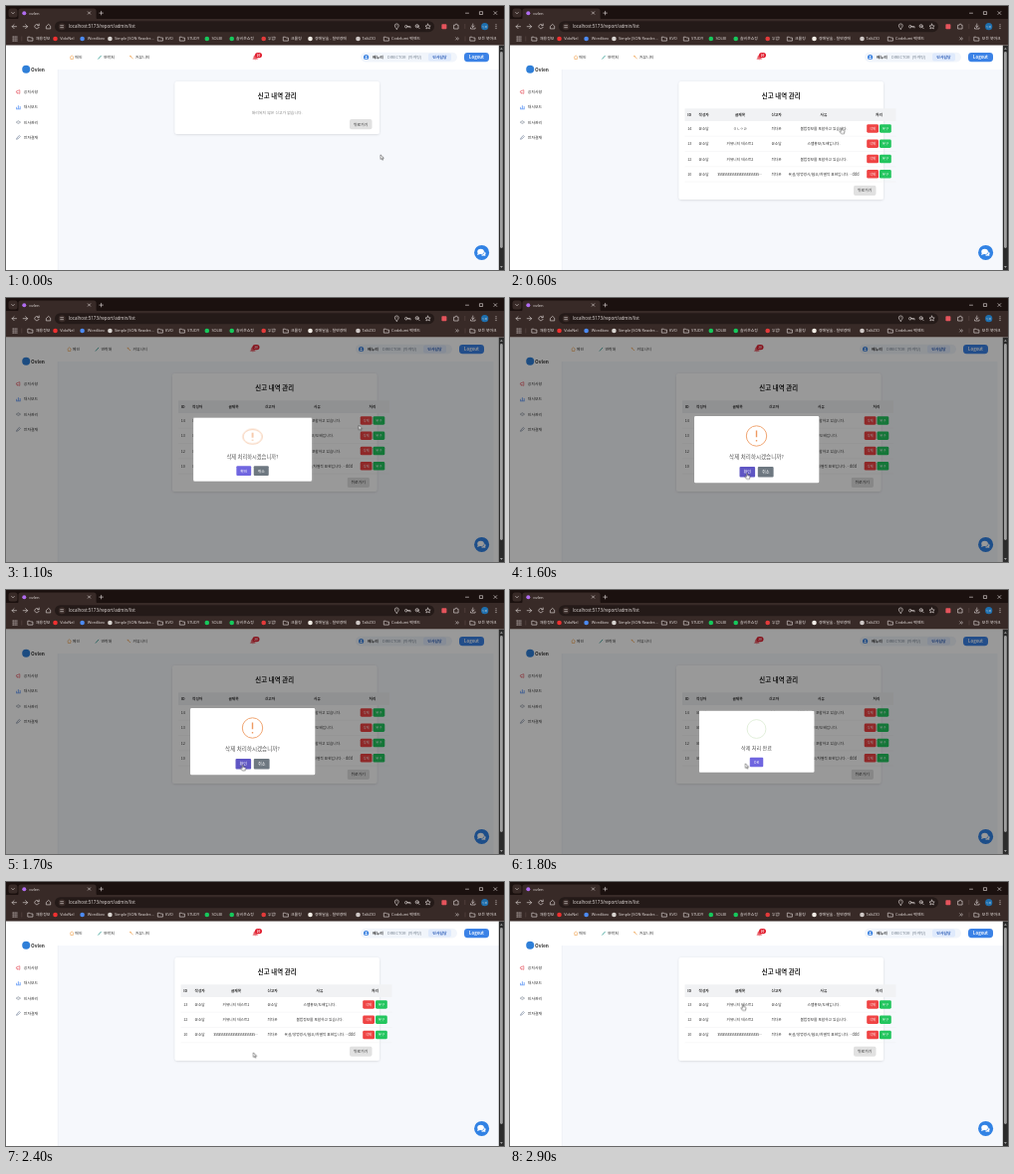
Recreate the animation shown at these times as an HTML page. Size 500x266 px, loop 3000 ms.

```html
<!DOCTYPE html>
<html lang="ko">
<head>
<meta charset="utf-8">
<title>Report list</title>
<style>
html, body { margin: 0; width: 100%; height: 100%; overflow: hidden; background: #fff; }
svg { display: block; width: 100vw; height: 100vh; }
text { font: 3.9px "Noto Sans CJK KR", "Noto Sans", sans-serif; fill: #333; white-space: pre; }
.ui text { font-family: "Open Sans", "Noto Sans CJK KR", sans-serif; fill: #e6dfdd; }
.mid text, text.mid { text-anchor: middle; }
.b { font-weight: 700; }
.line { fill: none; stroke: #dcd4d2; stroke-width: .65; stroke-linecap: round; stroke-linejoin: round; }
.cell text { font-size: 3.7px; }
.cell .btn, .w { fill: #fff; }
.cell .btn { font-size: 3.3px; }

/* The script moves every animation forward in tenths of a second. */
.t { animation: 3s step-end infinite paused; }
.loaded { animation-name: loaded; }
.empty { animation-name: empty; }
.card { animation-name: card; }
.back { animation-name: back; }
.first { animation-name: first; }
.rest { animation-name: rest; }
.open { animation-name: open; }
.shift { animation-name: shift; --dx: -2.5; }
.far { --dx: -5; }
.ask { animation-name: ask; }
.done { animation-name: done; }
.hover1 { animation-name: hover1; }
.hover2 { animation-name: hover2; }
.arrow { animation-name: arrow; }
.hand { animation-name: hand; }
.cursor { animation: move 3s ease-in-out infinite paused; }
.pop { transform-origin: 247.5px 152.5px; animation: pop .15s .983s both paused; }
.done .pop { animation-delay: 1.775s; }
.warn { transform-origin: 247.5px 139px; animation: flip .25s .983s both paused; }
.check { stroke-dasharray: 1 2; animation: draw .11s 1.977s linear both paused; }

@keyframes loaded { 0% { visibility: hidden } 3%, 100% { visibility: visible } }
@keyframes empty { 0% { visibility: visible } 3%, 100% { visibility: hidden } }
@keyframes card { 0% { height: 53px } 3% { height: 119px } 63%, 100% { height: 104px } }
@keyframes back {
  0% { transform: none }
  3% { transform: matrix(1, 0, 0, 1, 0, 66.8) }
  63%, 100% { transform: matrix(1, 0, 0, 1, 0, 51.5) }
}
@keyframes first { 0% { opacity: 1 } 63%, 100% { opacity: 0 } }
@keyframes rest { 0% { transform: none } 63%, 100% { transform: matrix(1, 0, 0, 1, 0, -15.3) } }
@keyframes open { 0% { visibility: hidden } 33% { visibility: visible } 79.5%, 100% { visibility: hidden } }
@keyframes shift {
  0% { transform: none }
  33% { transform: matrix(1, 0, 0, 1, var(--dx), 0) }
  79.5%, 100% { transform: none }
}
@keyframes ask { 0% { visibility: hidden } 33% { visibility: visible } 59%, 100% { visibility: hidden } }
@keyframes done { 0% { visibility: hidden } 59% { visibility: visible } 79.5%, 100% { visibility: hidden } }
@keyframes hover1 { 0% { fill: #7066e0 } 48%, 100% { fill: #5f56c4 } }
@keyframes hover2 { 0% { fill: #7066e0 } 69%, 100% { fill: #5f56c4 } }
@keyframes hand {
  0%, 35%, 59%, 79.5% { visibility: hidden }
  3%, 48%, 69%, 85%, 100% { visibility: visible }
}
@keyframes arrow {
  0%, 35%, 59%, 79.5% { visibility: visible }
  3%, 48%, 69%, 85%, 100% { visibility: hidden }
}
@keyframes move {
  0% { transform: matrix(1, 0, 0, 1, 376, 149.8) }
  20% { transform: matrix(1, 0, 0, 1, 333, 122.6) }
  33.333% { transform: matrix(1, 0, 0, 1, 364.5, 124) }
  50%, 55% { transform: matrix(1, 0, 0, 1, 238, 176.4) }
  60% { transform: matrix(1, 0, 0, 1, 236.3, 174.8) }
  72%, 77% { transform: matrix(1, 0, 0, 1, 249, 174.2) }
  96.667%, 100% { transform: matrix(1, 0, 0, 1, 234, 123.4) }
}
@keyframes pop {
  0% { transform: scale(.7) }
  45% { transform: scale(1.05) }
  80% { transform: scale(.95) }
  100% { transform: scale(1) }
}
@keyframes flip { from { transform: scaleY(0); opacity: 0 } to { transform: scaleY(1); opacity: 1 } }
@keyframes draw { from { stroke-dashoffset: 1 } to { stroke-dashoffset: 0 } }
</style>
</head>
<body>
<svg viewBox="0 0 500 266" preserveAspectRatio="none">
  <defs>
    <filter id="soft" x="-10%" y="-20%" width="120%" height="140%">
      <feDropShadow dx="0" dy=".6" stdDeviation="1.2" flood-opacity=".13"/>
    </filter>
    <path id="folder" d="M-2.3-1.8h1.7l.8.8h2.2v3.1h-4.7z" class="line"/>
  </defs>

  <!-- page -->
  <rect width="500" height="266" fill="#fff"/>
  <rect x="52" y="64" width="443" height="202" fill="#f6f8fc"/>
  <path d="M52.2 64V266" stroke="#e6e9ee" stroke-width=".5"/>
  <rect class="t open" x="489.5" y="64" width="5.5" height="202" fill="#fff"/>

  <g class="t shift">
    <path d="M64.2 51.5l1.9-1.7 1.9 1.7M64.8 51.3v2.2h2.6v-2.2" fill="none" stroke="#f0a04b" stroke-width=".6"/>
    <path d="M92.4 53.5l3.2-3.6" stroke="#41a59b" stroke-width=".9"/>
    <path d="M124.3 50.4l3.3 2.6M124.3 50.4h1.5" stroke="#f0a04b" stroke-width=".7"/>
    <g class="b">
      <text x="69.3" y="53">메인</text>
      <text x="98" y="53">연락처</text>
      <text x="130" y="53">커뮤니티</text>
    </g>
    <path d="M247.8 53.4q1-.7 1-2.2 0-1.6 1.5-1.6t1.5 1.6q0 1.5 1 2.2zM249.6 54h1.4" fill="#e8606a" stroke="#e8606a" stroke-width=".4"/>
    <rect x="250" y="47" width="7" height="5.2" rx="2.6" fill="#e11d2e"/>
    <text class="w mid b" x="253.5" y="50.8" style="font-size:3px;fill:#fff">20</text>
  </g>

  <g class="t shift far">
    <rect x="356" y="46.8" width="97" height="9.6" rx="4.8" fill="#f1f5fb"/>
    <circle cx="361.6" cy="51.5" r="2.6" fill="#3b82e0"/>
    <circle cx="361.6" cy="50.8" r=".8" class="w"/>
    <path d="M360 53.2q1.6-2.2 3.2 0z" class="w"/>
    <text class="b" x="368" y="53">배누리</text>
    <text x="383" y="53" style="fill:#7b8794">DIRECTOR  (마케팅)</text>
    <rect x="424" y="47.6" width="23" height="8" rx="2" fill="#dfeafc"/>
    <text class="mid b" x="435.5" y="53" style="fill:#3160b8">인사담당</text>
    <rect x="460" y="47" width="25" height="9.2" rx="3.4" fill="#3b82e6"/>
    <text class="w mid b" x="472.5" y="53.1" style="font-size:4.3px">Logout</text>
  </g>

  <circle cx="20.2" cy="63.8" r="4" fill="#2f7fd8"/>
  <text class="b" x="25" y="65.7" style="font-size:4.8px">Ovlen</text>
  <g id="side"></g>

  <g class="t shift">
    <rect class="t card" x="169.5" y="76" width="205.5" height="53" rx="2.5" fill="#fff" filter="url(#soft)"/>
    <text class="mid b" x="272.2" y="93.2" style="font-size:6.4px;fill:#222">신고 내역 관리</text>
    <text class="t empty mid" x="272.2" y="109.2" style="fill:#888">처리되지 않은 신고가 없습니다.</text>
    <g class="t loaded">
      <rect x="175.5" y="103.3" width="212" height="12.7" fill="#f1f2f4"/>
      <g id="rows" class="mid cell"></g>
    </g>
    <g class="t back">
      <rect x="345" y="114" width="22.5" height="10.3" rx="2" fill="#e1e1e1"/>
      <text class="mid" x="356.2" y="120.6">뒤로가기</text>
    </g>
  </g>

  <circle cx="477.6" cy="248.4" r="7.5" fill="#3182e4"/>
  <ellipse cx="476.6" cy="247.4" rx="3.3" ry="2.6" class="w"/>
  <path d="M474 248.5l-1 2.4 3-1z" class="w"/>
  <path d="M480.4 247.3q2.2 1.9.6 3.6l.6 1.2-1.8-.5q-2 .4-3-.8 3.7-.3 3.6-3.5z" class="w"/>

  <rect class="t open" y="39.5" width="495" height="226.5" fill="#000" fill-opacity=".4"/>

  <!-- dialogs -->
  <g class="t ask mid"><g class="pop">
    <rect x="185" y="119" width="125.3" height="67.3" rx="1.4" fill="#fff"/>
    <g class="warn">
      <circle cx="247.5" cy="139" r="10.2" fill="none" stroke="#f0a572" stroke-width="1"/>
      <path d="M247.5 133.6v6.6M247.5 143v1.5" stroke="#ee9a62" stroke-width="1.4"/>
    </g>
    <text x="247.5" y="162" style="font-size:5.5px;fill:#545454">삭제 처리하시겠습니까?</text>
    <rect class="t hover1" x="230.5" y="170" width="15.6" height="10.5" rx="1.1"/>
    <rect x="248.8" y="170" width="15.8" height="10.5" rx="1.1" fill="#6e7881"/>
    <text class="w" x="238.3" y="176.8" style="font-size:4.1px">확인</text>
    <text class="w" x="256.7" y="176.8" style="font-size:4.1px">취소</text>
  </g></g>

  <g class="t done mid"><g class="pop">
    <rect x="185" y="119" width="125.3" height="67.3" rx="1.4" fill="#fff"/>
    <circle cx="247.5" cy="139" r="10.2" fill="none" stroke="#e0eed8" stroke-width="1"/>
    <path class="check" pathLength="1" d="M241.4 139.4l4.2 4.2 8.4-8.4" fill="none" stroke="#a5dc86" stroke-width="1.3"/>
    <text x="247.5" y="162" style="font-size:5.5px;fill:#545454">삭제 처리 완료</text>
    <rect class="t hover2" x="240.2" y="170" width="14.6" height="10.5" rx="1.1"/>
    <text class="w" x="247.5" y="176.8" style="font-size:4.1px">OK</text>
  </g></g>

  <!-- scrollbar -->
  <rect x="494.8" y="39.5" width="5.2" height="226.5" fill="#2c2c2c"/>
  <rect x="496" y="46" width="2.8" height="198" rx="1.4" fill="#9f9f9f"/>
  <path d="M496 43.8l1.4-1.9 1.4 1.9zM496 262l1.4 1.9 1.4-1.9z" fill="#9f9f9f"/>

  <!-- browser -->
  <g class="ui">
    <rect width="500" height="14" fill="#1b110f"/>
    <rect y="13" width="500" height="26.5" fill="#382a27"/>
    <rect x="2.5" y="2.5" width="9" height="9" rx="2.5" fill="#382a27"/>
    <path d="M10 14q2.5 0 2.5-2.5V5q0-2.6 2.6-2.6H88q2.6 0 2.6 2.6v6.5q0 2.5 2.5 2.5z" fill="#382a27"/>
    <circle cx="18.3" cy="7.2" r="2" fill="#b06cf0"/>
    <text x="23.3" y="8.7" style="font-size:4.1px">ovlen</text>
    <rect x="49" y="15.2" width="381" height="11" rx="5.5" fill="#241a18"/>
    <circle cx="56.2" cy="20.7" r="3.5" fill="#382a27"/>
    <text x="63" y="22.3" style="font-size:4.45px">localhost:5173/report/admin/list</text>
    <g class="line">
      <path d="M5.7 6.5l1.3 1.3 1.3-1.3M82.3 5.8l2.4 2.4m0-2.4l-2.4 2.4M95.6 5.3v3.6m-1.8-1.8h3.6"/>
      <path d="M461.5 7.2h3M475.8 5.7h2.8v2.8h-2.8zM489.9 5.6l2.9 2.9m0-2.9l-2.9 2.9"/>
      <path d="M10.5 20.7h-4.4m2-2l-2 2 2 2M17.2 20.7h4.4m-2-2l2 2-2 2"/>
      <path d="M32.9 19.4a2.2 2.2 0 1 0 .2 2M33.2 18v1.7h-1.7M40.7 20.2l2-1.8 2 1.8v2.7h-4z"/>
      <path d="M54.7 19.7h2.8m-2.8 2h2.8"/>
      <path d="M392.3 23.2q-2-2.2-2-3.3a2 2 0 0 1 4 0q0 1.1-2 3.3zM392.3 19.8v.1"/>
      <circle cx="401.8" cy="20.7" r="1.3"/><path d="M403.1 20.7h3v1.2m-1.3-1.2v.9"/>
      <circle cx="412.7" cy="20.2" r="1.6"/><path d="M413.9 21.4l1.4 1.4M412 20.2h1.4"/>
      <path d="M423.6 18.1l.8 1.7 1.8.2-1.3 1.2.4 1.8-1.7-.9-1.7.9.4-1.8-1.3-1.2 1.8-.2z"/>
      <path d="M450 19.2h1.2q.1-1.2.9-1.2t.9 1.2h1.1v3.8h-4.1z"/>
      <path d="M468.8 18v3.4m-1.4-1.4l1.4 1.4 1.4-1.4M466.5 22v1h4.6v-1"/>
      <path d="M492 18.8v.1m0 1.8v.1m0 1.8v.1" stroke-width="1"/>
      <path d="M451.7 31.8l1.1 1.1-1.1 1.1m1.7-2.2l1.1 1.1-1.1 1.1"/>
      <path d="M7 31h4M7 33h4M7 35h4" stroke-width="1.1" stroke-dasharray=".4 1.5"/>
    </g>
    <path d="M15.8 30.5v5M460.8 18v5M461 30.5v5" stroke="#65524e" stroke-width=".5"/>
    <rect x="437.4" y="18.2" width="5" height="5" rx=".8" fill="#e5545c"/>
    <circle cx="480.7" cy="20.7" r="3.6" fill="#1d6fae"/>
    <text class="mid" x="480.7" y="21.7" style="font-size:2.7px">누리</text>
    <g id="marks"></g>
  </g>

  <g class="cursor">
    <path class="t arrow" d="M0 0v4.6l1.1-1 .8 1.8.8-.4-.8-1.7h1.5z" fill="#fff" stroke="#222" stroke-width=".45"/>
    <path class="t hand" d="M-.6.5q.6-.9 1.1 0v1.7l2 .5q.6.2.5.9l-.5 2.4h-2.9l-1.9-2.4q.4-.9 1.7.1z" fill="#fff" stroke="#222" stroke-width=".45"/>
  </g>
</svg>

<script>
const $ = id => document.getElementById(id);
const text = (x, y, s, cls = '') => `<text x="${x}" y="${y}" class="${cls}">${s}</text>`;

// icon x, label x, label, icon colour (none: folder)
const marks = [
  [24.5, 30, '채용정보'], [49.5, 54.3, 'VidoNel', '#f03030'], [76.6, 81.8, 'Wordibex', '#4c8bf5'],
  [104.4, 109, 'Simple JSON Reader...', '#d8d4d0'], [155, 160, 'KVO'], [177, 182, 'STUDY'],
  [201.8, 206.4, 'SOLBI', '#16c95c'], [226.7, 231, '솔비온쇼핑', '#16c95c'], [258.7, 263, '두밤!', '#e33a3a'],
  [281, 286, '크롤링'], [305.5, 310, '경매달숲 - 절반경매', '#f2ede6'], [353.5, 357.6, 'TalkZIO', '#cfc8c6'],
  [382, 387, 'Codelumi 백엔드'], [468.5, 473.8, '모든 북마크']
];
$('marks').innerHTML = marks.map(([ix, x, s, c]) =>
  (c ? `<circle cx="${ix}" cy="33" r="2.3" fill="${c}"/>` : `<use href="#folder" x="${ix}" y="33"/>`) +
  text(x, 34.4, s)).join('');

const side = [
  ['공지사항', '#e8606a', 'M-2-.6l3.4-1.2v3.6l-3.4-1.2zM-1 .8v1.2'],
  ['대시보드', '#4c8bf5', 'M-1.8 1.8v-1.8M0 1.8v-3.4M1.8 1.8v-2.5M-2.3 2h4.6'],
  ['인사관리', '#8a93a0', 'M-2.2 0q2.2-2.8 4.4 0q-2.2 2.8-4.4 0zM-.3 0h.6'],
  ['전자결재', '#7d8ca3', 'M-1.9 1.9l.5-1.5 2.4-2.3 1 1-2.4 2.3z']
];
$('side').innerHTML = side.map(([s, c, d], i) => {
  const y = 86.5 + i * 15.3;
  return `<path d="${d}" transform="matrix(1 0 0 1 12.4 ${y})" fill="none" stroke="${c}" stroke-width=".7"/>` +
    text(17.8, y + 1.4, s);
}).join('');

const cols = [180.3, 194.6, 231, 267.5, 315, 370.5];
const abuse = '불법정보를 포함하고 있습니다.';
const rows = [
  [14, '윤소담', 'ㅁㄴㅇㄹ', '최다온', abuse],
  [13, '윤소담', '커뮤니티 테스트1', '윤소담', '스팸홍보/도배입니다.'],
  [12, '윤소담', '커뮤니티 테스트2', '최다온', abuse],
  [10, '윤소담', 's'.repeat(24) + '…', '최다온', '욕설/생명경시/혐오/차별적 표현입니다. - ddd']
];
const button = (x, y, s, c) =>
  `<rect x="${x}" y="${y - 4.3}" width="11.8" height="8.5" rx="1.4" fill="${c}"/>` + text(x + 5.9, y + 1.2, s, 'btn');
const row = (r, i) => {
  const y = 123.5 + i * 15.3;
  return r.map((s, k) => text(cols[k], y + 1.4, s)).join('') +
    button(358.2, y, '삭제', '#ef4444') + button(371, y, '복구', '#22c55e') +
    `<path d="M175.5 ${y + 7.7}h212" stroke="#eceef0" stroke-width=".4"/>`;
};
const body = rows.map(row);
$('rows').innerHTML =
  ['ID', '작성자', '글제목', '신고자', '사유', '처리'].map((s, i) => text(cols[i], 111.2, s, 'b')).join('') +
  `<g class="t first">${body[0]}</g><g class="t rest">${body.slice(1).join('')}</g>`;

const anims = document.getAnimations();
const start = performance.now();
function tick() {
  const t = Math.floor((performance.now() - start) % 3000 / 100) * 100;
  for (const a of anims) a.currentTime = t;
  requestAnimationFrame(tick);
}
tick();
</script>
</body>
</html>
```
